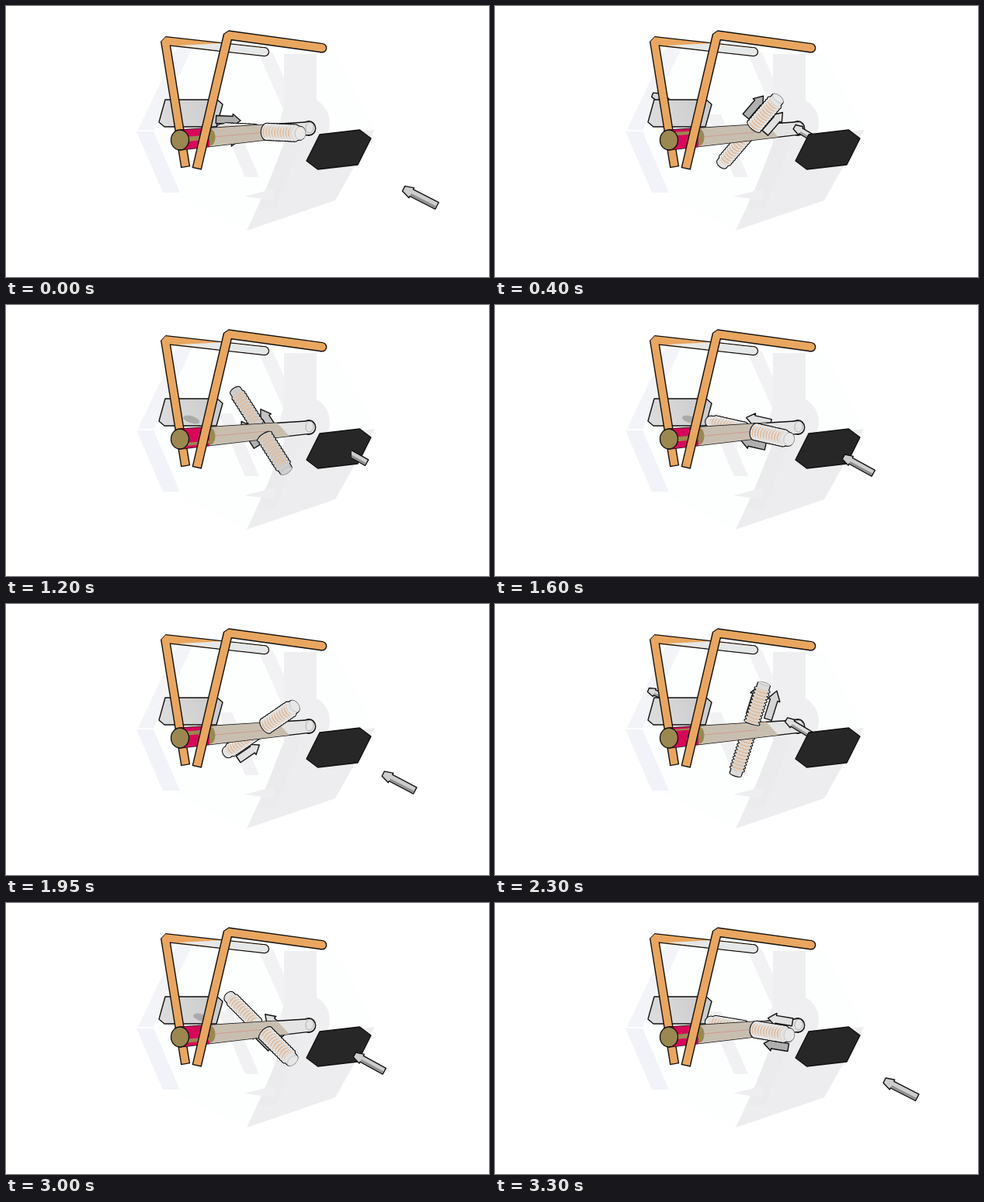
An HTML page with a canvas for the animation above (3350 ms loop, 622 by 350 pixels).

```html
<!DOCTYPE html>
<html lang="en">
<head>
<meta charset="utf-8">
<title>Rotating machine</title>
<style>
html, body { margin: 0; width: 100%; height: 100%; overflow: hidden; background: #fff; }
canvas { display: block; }
</style>
</head>
<body>
<canvas id="stage" width="622" height="350"></canvas>
<script>
const ctx = document.getElementById('stage').getContext('2d');
const FRAMES = 67, STEP = 50, TAU = Math.PI * 2;
const INK = '#111', ORANGE = '#e9a660', OLIVE = '#9b8850', PALE = '#e5e8e8';
const HUB = [328, 162], NEAR = [51, 4], UP = [0, -65];
const gray = v => `rgb(${v | 0},${v | 0},${v | 0})`;
const mix = (a, b, k) => [a[0] + (b[0] - a[0]) * k, a[1] + (b[1] - a[1]) * k];

function poly(pts, fill, line = 1.4) {
  ctx.beginPath();
  pts.forEach(p => ctx.lineTo(...p));
  ctx.closePath();
  ctx.fillStyle = fill;
  ctx.fill();
  if (!line) return;
  ctx.lineWidth = line;
  ctx.strokeStyle = INK;
  ctx.stroke();
}

function oval(x, y, rx, ry, turn, fill, line = 0, color = INK) {
  ctx.beginPath();
  ctx.ellipse(x, y, rx, ry, turn, 0, TAU);
  if (fill) { ctx.fillStyle = fill; ctx.fill(); }
  if (line) { ctx.lineWidth = line; ctx.strokeStyle = color; ctx.stroke(); }
}

// Slanted strip with level ends
function band(a, b, w, fill) {
  const h = w / 2;
  poly([[a[0] - h, a[1]], [a[0] + h, a[1]], [b[0] + h, b[1]], [b[0] - h, b[1]]], fill, 0);
}

// Six-sided plate: three corners and their mirror images
function plate(c, half, fill) {
  const side = s => half.map(p => [c[0] + s * p[0], c[1] + s * p[1]]);
  poly([...side(1), ...side(-1)], fill);
}

function clipped(x, w, draw) {
  ctx.save();
  ctx.beginPath();
  ctx.rect(x, 0, w, 350);
  ctx.clip();
  draw();
  ctx.restore();
}

function backdrop() {
  ctx.fillStyle = '#fff';
  ctx.fillRect(0, 0, 622, 350);
  poly([[230, 52], [424, 62], [475, 160], [424, 251], [310, 290], [210, 242], [170, 161]], '#fdfefe', 0);
  band([231, 52], [180, 160], 20, '#f3f4f7');
  band([179, 162], [213, 241], 22, '#f2f3f8');
  band([282, 140], [317, 221], 18, '#f1f1f4');
  band([334, 60], [374, 150], 19, '#f2f2f5');
  band([379, 62], [379, 190], 42, '#efeff2');
  oval(385, 151, 32, 33, 0, '#efeff2');
  poly([[364, 172], [475, 160], [424, 251], [310, 290]], '#ededef', 0);
  band([371, 172], [336, 262], 22, '#ebebed');
  poly([[307, 246], [345, 236], [345, 251]], '#eeeef1', 0);
}

// Leg and arm of one bent bar, with a rounded arm end
function bar(foot, elbow, tip, w) {
  ctx.lineJoin = 'bevel';
  for (const [grow, color] of [[1.4, INK], [0, ORANGE]]) {
    const end = mix(foot, elbow, -grow / 170);
    ctx.beginPath();
    [end, elbow, tip].forEach(p => ctx.lineTo(...p));
    ctx.lineWidth = w + grow * 2;
    ctx.strokeStyle = color;
    ctx.stroke();
    oval(...tip, w / 2 + grow, w / 2 + grow, 0, color);
  }
  ctx.lineJoin = 'round';
}

function backBar() {
  const elbow = [205, 45], tip = [333, 59.2];
  bar([231, 207], elbow, tip, 9.4);
  const mid = mix(elbow, tip, .56);
  poly([[222, 51], [mid[0], mid[1] - 4.7], [tip[0], tip[1] - 4.7], [tip[0], tip[1] + 4.7], [mid[0], mid[1] + 4.7]], PALE, 0);
  oval(...tip, 4.7, 4.7, 0, PALE);
}

// Narrow arrow pointing from tail to head
function arrow(head, tail, w, light) {
  const dx = head[0] - tail[0], dy = head[1] - tail[1], len = Math.hypot(dx, dy);
  const at = (a, b) => [head[0] - (dx * a + dy * b) / len, head[1] - (dy * a - dx * b) / len];
  const h = w * 2.4;
  poly([at(0, -w * .7), at(h, -w * 1.5), at(h, -w), at(len, -w), at(len, w), at(h, w), at(h, w * 1.5), at(0, w * .8)], gray(light));
  poly([at(h, -w + .7), at(len - .8, -w + .7), at(len - .8, -w * .2), at(h, -w * .2)], gray(light * .7), 0);
}

function leftSide(p) {
  if (p > 21) {
    const x = 265 - p * 2.6, y = 158 - p * 1.8;
    arrow([x, y], [x + 20, y + 8], 3.6, 215);
  }
  const g = ctx.createLinearGradient(196, 155, 270, 121);
  g.addColorStop(0, '#dedede');
  g.addColorStop(1, '#cbcbcb');
  plate([238, 138.5], [[-33, -17.5], [34, -17.5], [41, -11.5]], g);
  if (p > 8 && p < 18) oval(290 - p * 3.2, 148, 11, 4.5, .3, '#aaa');
}

function shaft(ang) {
  const skew = -.09;
  const edge = (x, side) => [x, 173 + (x - 224) * skew + side * (13 - (x - 224) * .028)];
  const tube = (a, b, fill, line, slant = 0) =>
    poly([edge(a, -1), edge(b, -1), edge(b + slant, 1), edge(a, 1)], fill, line);
  const [ex, ey] = edge(390, 0);
  oval(ex, ey, 8, 8.6, 0, '#e4e4e4', 2.8);
  tube(224, 390, '#e4e4e4', 1.4);
  oval(ex, ey, 8, 8, 0, '#e4e4e4');
  oval(ex + 1, ey - 1, 5, 7, .15, null, .7, '#999');
  tube(262, 349, '#c8beb0', 0, 16);
  ctx.beginPath();
  ctx.moveTo(...edge(266, 0));
  ctx.lineTo(...edge(338, 0));
  ctx.lineWidth = .7;
  ctx.strokeStyle = '#d58c80';
  ctx.stroke();
  oval(...edge(263, 0), 6.5, 11, 0, OLIVE);
  tube(224, 262, '#d8075a', 0);
  for (const a of [ang, ang + Math.PI]) {
    const c = Math.cos(a);
    if (c < .1) continue;
    const lift = Math.sin(a) * .8, h = .24 * c;
    poly([edge(228, -lift - h), edge(264, -lift - h), edge(264, -lift + h), edge(228, -lift + h)], OLIVE, 0);
  }
  oval(224, 173, 11.5, 13, 0, OLIVE, 1.3);
}

function point(ang, r) {
  const c = Math.cos(ang) * r, s = Math.sin(ang) * r;
  return [HUB[0] + NEAR[0] * c + UP[0] * s, HUB[1] + NEAR[1] * c + UP[1] * s];
}

// One threaded half of the rod, as a stack of slices
function halfRod(ang, tone) {
  const z = Math.cos(ang), a = point(ang, .15), b = point(ang, 1);
  const turn = Math.atan2(b[1] - a[1], b[0] - a[0]);
  const w = 9.6 * (1 + .1 * z), depth = .9 + 6 * z * z;
  const slices = [];
  for (let i = 0; i < 60; i++) {
    const cap = i > 52, ridge = !cap && i % 5 < 2;
    slices.push({ p: mix(a, b, i / 60), r: ridge ? w : w * .8, cap, ridge });
  }
  if (z < 0) slices.reverse();
  for (const s of slices) oval(...s.p, depth + 1.1, s.r + 1.1, turn, INK);
  for (const s of slices) {
    oval(...s.p, depth, s.r, turn, s.ridge || s.cap ? gray(tone) : '#dfbfa5');
  }
  if (z > .3) oval(...b, depth, w * .8, turn, gray(tone + 4), .6, '#aaa');
}

// Pair of arrows travelling beside the rod
function coreArrows(dir, q, z, sink, tone) {
  const v = point(dir, 1).map((n, i) => n - HUB[i]);
  const len = Math.hypot(...v), k = 1 + .2 * z;
  for (const side of [-1, 1]) {
    const mid = side * (15 - 4 * sink) * k + 7 * sink;
    const at = (a, off) => [0, 1].map(i =>
      HUB[i] + v[i] * (q + a) + (i ? v[0] : -v[1]) / len * (mid + off));
    poly([at(-.4, -5), at(.02, -5), at(.02, -8), at(.22, 0), at(.02, 8), at(.02, 5), at(-.4, 5)],
      gray(side < 0 ? Math.min(tone, 175) : tone));
  }
}

function flux(p, x, w) {
  clipped(x, w, () => arrow([512 - 5.27 * p, 236 - 3.32 * p], [555 - 5.65 * p, 258 - 3.4 * p], 4.8 - p * .03, p > 20 ? 222 : 205));
}

function draw(f) {
  const ang = f / FRAMES * TAU + .025, s = Math.sin(ang);
  // Flux phase: 28 thirds of a step; its tail end overlaps the next round
  let p = f * 3 % 28;
  if (f && p < 1.5) p += 28;
  const m = ang % Math.PI;
  const dark = Math.max(0, Math.sin((m - 1.1) * 2.2)) * (m > 1.1);
  const tone = 228 - 42 * dark;
  const dir = s >= 0 ? ang : ang + Math.PI;
  const near = Math.cos(ang) >= 0 ? ang : ang + Math.PI;
  const q = -.74 + .056 * p, z = q * Math.cos(dir);
  const core = () => coreArrows(dir, q, z, Math.max(0, -s), 225 - 58 * dark);

  backdrop();
  leftSide(p);
  backBar();
  if (z < .2) core();
  halfRod(near + Math.PI, tone);
  shaft(ang);
  if (z >= .2) core();
  halfRod(near, tone);
  bar([246, 209], [286, 37.5], [407, 54.2], 9.8);
  if (p > 18) flux(p, 0, 422);
  plate([428.5, 185.5], [[-41.5, 14.5], [-24.5, -19.5], [27, -25.5]], '#272727');
  if (p < 19) flux(p, 445, 177);
}

ctx.lineJoin = 'round';
const begin = performance.now();
function tick() {
  draw(Math.floor(Math.max(0, performance.now() - begin) / STEP) % FRAMES);
  requestAnimationFrame(tick);
}
tick();
</script>
</body>
</html>
```
